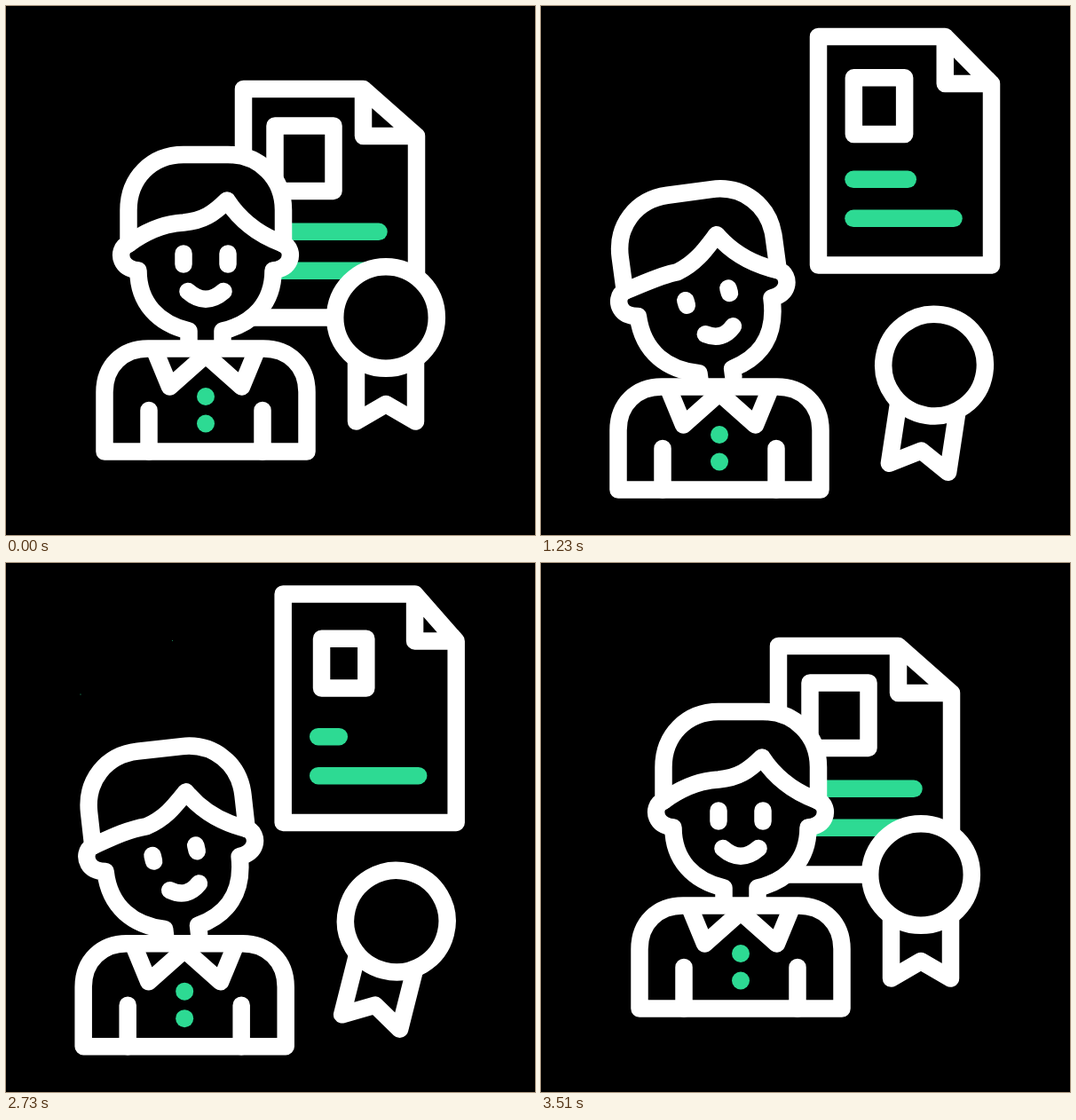
Recreate the animation shown at these times as an HTML page. Size 596 px wide and 596 px high, loop 3.6 s.

```html
<!DOCTYPE html>
<html lang="en">
<head>
<meta charset="utf-8">
<title>Certified person</title>
<style>
  html, body { margin: 0; width: 100%; height: 100%; overflow: hidden; background: #000; }
  svg { display: block; width: 100vw; height: 100vh; }
  .ink { fill: none; stroke: #fff; stroke-width: 19.5; stroke-linecap: round; stroke-linejoin: round; }
  .solid { fill: #000; }
  .bar { stroke: #2dda93; }
  .dot { fill: #2dda93; stroke: none; }
</style>
</head>
<body>
<svg viewBox="0 0 596 596" class="ink">
  <rect width="596" height="596" fill="#000" stroke="none"/>
  <g id="sparkles" class="dot"></g>
  <g id="page">
    <path id="sheet" class="solid"/>
    <path id="photo"/>
    <path id="bar1" class="bar"/>
    <path id="bar2" class="bar"/>
  </g>
  <g id="person">
    <g id="head">
      <path fill="#000" stroke="none" d="M138 268V230C138 190 165 167.500 200 167.500H250C285 167.500 312.500 195 312.500 232V268L320 280L301 298C301 335 278 358 244 366V380H206V366C172 358 149 335 149 298L130 280Z"/>
      <path d="M138 268V230C138 194 164 167.500 200 167.500H250C286 167.500 312.500 194 312.500 230V268"/>
      <path id="fringe"/>
      <path id="jaw"/>
    </g>
    <g id="face">
      <path id="eyes"/>
      <path id="smile"/>
    </g>
    <path class="solid" d="M111 502V435C111 405 132 386 160 386H290C318 386 339 405 339 435V502Z"/>
    <path d="M168 389L184.500 429L225 393L265.500 429L282 389M161 455.500V502M289 455.500V502"/>
    <circle class="dot" cx="225" cy="440" r="10"/>
    <circle class="dot" cx="225" cy="470.500" r="10"/>
  </g>
  <g id="medal">
    <path class="solid" d="M394.500 400V468L428 448.500L461.500 468V400"/>
    <circle class="solid" cx="428" cy="351" r="57.300"/>
  </g>
</svg>
<script>
const LOOP = 3600, STEP = 30;
const el = id => document.getElementById(id);
const set = (id, name, value) => el(id).setAttribute(name, value);

// Eased value through [time, value] keys, held at both ends.
function track(t, ...keys) {
  if (t <= keys[0][0]) return keys[0][1];
  for (let i = 1; i < keys.length; i++) {
    const [t0, a] = keys[i - 1], [t1, b] = keys[i];
    if (t < t1) {
      const u = (t - t0) / (t1 - t0);
      return a + (b - a) * u * u * (3 - 2 * u);
    }
  }
  return keys[keys.length - 1][1];
}

function drawPage(t, out) {
  set('page', 'transform', `translate(${45 * out} ${-59 * out})`);
  const fold = 402.5 + track(t, [900, 0], [1500, 13.5], [2700, 13.5], [3300, 0]);
  set('sheet', 'd', `M267.5 93.5H${fold}L462.5 146.5V351H267.5ZM${fold} 93.5V146.5H462.5`);

  const size = track(t, [900, 1], [1500, 0.77], [2100, 1.1], [2700, 0.76], [3300, 1]);
  const w = 66 * size, h = 73.5 * size;
  const x = 336 + track(t, [1500, 0], [2100, 4.5], [2700, 0]);
  set('photo', 'd', `M${x - w / 2} ${171.7 - h / 2}h${w}v${h}h${-w}Z`);

  const full = 113, short = 23;
  const first = track(t, [900, full], [1500, short], [2100, full], [2700, short], [3300, full]);
  const second = track(t, [1500, full], [2100, short + 3], [2700, full]);
  set('bar1', 'd', `M307 254.300h${first}`);
  set('bar2', 'd', `M307 298.300h${second}`);
}

// One ear, cheek and side of the neck; the chin slides as the head tilts.
function jawSide(side, tilt) {
  const x = dx => 225 + side * dx;
  const chin = dx => x(dx) + 2.5 * tilt;
  const drop = 5 * tilt;
  return `M${x(87)} 268C${x(95)} 271 ${x(97)} 280 ${x(94)} 287C${x(91)} 294 ${x(84)} 297 ${x(76)} 298` +
    `C${x(76)} ${335 + drop} ${chin(53)} ${358 + drop} ${chin(19)} ${366 + drop}V380`;
}

function drawPerson(t, out) {
  set('person', 'transform', `translate(${-24 * out} ${43 * out})`);
  const tilt = track(t, [300, 0], [1350, 1], [2470, 1], [3370, 0]);
  set('head', 'transform', `translate(0 ${-3 * tilt}) rotate(${-8 * tilt} 225 420)`);
  const sag = 11 * tilt;
  set('fringe', 'd', `M138 268C160 ${252 + sag} 180 ${245 + sag} 200 ${244 + sag}` +
    `C222 ${242 + sag / 2} 234 234 249 219C264 242 285 258 312.5 268`);
  set('jaw', 'd', jawSide(-1, tilt) + jawSide(1, tilt));

  set('face', 'transform', `rotate(${-16.5 * tilt} 225 328)`);
  const open = track(t, [1800, 1], [1950, 0], [2100, 1]);
  const half = (6 - 3.3 * tilt) * open;
  const y = 285 - 2.5 * tilt;
  const eye = x => `M${x - tilt} ${y - half}v${2 * half + 0.01}`;
  set('eyes', 'd', eye(200) + eye(250));
  const reach = 20 - 4 * tilt, mid = 225 + 1.5 * tilt, ends = 321.5 + tilt;
  set('smile', 'd', `M${mid - reach} ${ends}Q${mid} ${339 - 4 * tilt} ${mid + reach} ${ends}`);
}

function drawMedal(t, out) {
  const swing = track(t, [900, 0], [1500, 15], [2085, -15], [2640, 15], [3270, 0]);
  set('medal', 'transform', `translate(${20 * out} ${54 * out}) rotate(${swing} 428 318)`);
}

function drawSparkles(t) {
  const spread = track(t, [2700, 0], [3300, 38]);
  const r = track(t, [2700, 0], [3000, 10.3], [3300, 0]);
  [...el('sparkles').children].forEach((dot, i) => {
    const [cx, cy] = i < 4 ? [187.5, 87.5] : [84, 148];
    const angle = i * Math.PI / 2;
    dot.setAttribute('cx', cx + spread * Math.cos(angle));
    dot.setAttribute('cy', cy + spread * Math.sin(angle));
    dot.setAttribute('r', r);
  });
}

function draw(t) {
  const out = track(t, [300, 0], [900, 1], [2700, 1], [3300, 0]);
  drawPage(t, out);
  drawPerson(t, out);
  drawMedal(t, out);
  drawSparkles(t);
}

el('sparkles').innerHTML = '<circle/>'.repeat(8);
const start = performance.now();
function tick() {
  const t = (performance.now() - start) % LOOP;
  draw(Math.floor(t / STEP) * STEP);
  requestAnimationFrame(tick);
}
tick();
</script>
</body>
</html>
```
